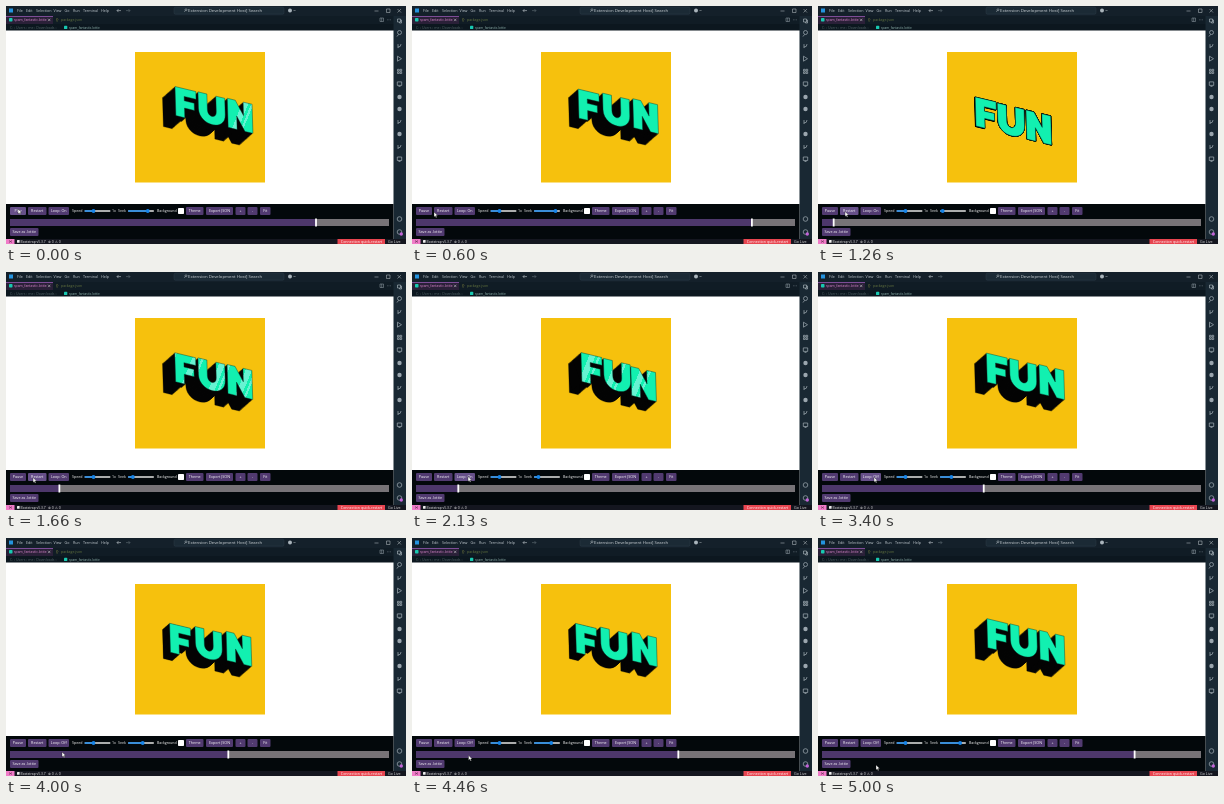
An HTML page for the animation above (5070 ms loop, 400 by 238 pixels).

```html
<!DOCTYPE html>
<html lang="en">
<head>
<meta charset="utf-8">
<title>Animation preview</title>
<style>
html, body { margin: 0; height: 100%; overflow: hidden; background: #03080b; }
svg { display: block; width: 100vw; height: 100vh; font-family: "Open Sans", "Noto Sans", sans-serif; }
</style>
</head>
<body>
<svg id="stage" viewBox="0 0 400 238"></svg>
<script>
const LOOP = 5070, STEP = 200 / 3;
const LEFT = 4, RIGHT = 383, RATE = 0.0943; // progress bar, px per ms
const LAYERS = 14;
const LETTERS = [
  'M0 0H21V8H9V12.5H19V20H9V30H0Z',
  'M23 0H32V16C32 24 41 24 41 16V0H50V17C50 35 23 35 23 17Z',
  'M52 0H60L68 14V0H77V30H69L61 16V30H52Z'
];

const rect = (x, y, w, h, fill, more = '') =>
  `<rect x="${x}" y="${y}" width="${w}" height="${h}" fill="${fill}" ${more}/>`;
const text = (x, y, str, fill = '#ddd', size = 3.7, more = '') =>
  `<text x="${x}" y="${y}" fill="${fill}" font-size="${size}" ${more}>${str}</text>`;
const line = (d, color = '#8b98a3', width = 0.6) =>
  `<path d="${d}" fill="none" stroke="${color}" stroke-width="${width}"/>`;
const button = (x, y, w, label, id = '') =>
  rect(x, y, w, 8, '#513a70', 'rx="1" class="button"') +
  text(x + w / 2, y + 5.4, label, '#fff', 3.7, `text-anchor="middle" ${id && `id="${id}"`}`);
const slider = (x, id, at) =>
  rect(x, 204.3, 26, 1.4, '#e4e4e4', 'rx=".7"') +
  rect(x, 204.3, at - x, 1.4, '#1684e8', `rx=".7" id="${id}Fill"`) +
  `<circle id="${id}" cx="${at}" cy="205" r="1.9" fill="#1684e8"/>`;

function titleBar() {
  const menu = [[11, 'File'], [20, 'Edit'], [30, 'Selection'], [47.5, 'View'], [58.5, 'Go'],
    [67, 'Run'], [77, 'Terminal'], [95, 'Help']];
  return rect(0, 0, 400, 10, '#14202a') + rect(3, 2.5, 4, 4, '#2493df') +
    menu.map(([x, s]) => text(x, 6, s, '#c4ccd2')).join('') +
    line('M115 4.6h-4l1.5-1.5M111 4.6l1.5 1.5', '#c0c8cd') +
    line('M120 4.6h4l-1.5-1.5M124 4.6l-1.5 1.5', '#5e6a73') +
    rect(168, 1.2, 110, 7, '#1b2a35', 'rx="1.5" stroke="#33424e" stroke-width=".4"') +
    line('M181 3.8a1 1 0 1 1-2 0a1 1 0 1 1 2 0M179.3 4.6l-1 1.2', '#c0c8cd', 0.5) +
    text(182, 6.2, 'Extension Development Host] Search', '#d0d6da', 4.3) +
    '<circle cx="284" cy="4.6" r="2" fill="#aab4bb"/>' +
    line('M287.5 4l1 1l1-1M368.5 5h4M380.5 3h3.5v3.5h-3.5zM391.5 3l3.5 3.5M395 3l-3.5 3.5', '#c0c8cd', 0.5);
}

function tabs() {
  return rect(0, 10, 400, 8, '#101c25') + rect(0, 10, 47, 8, '#2a2038') +
    rect(0, 10, 47, 0.6, '#b26ad6') + rect(3, 12, 3.5, 3.5, '#18c9b1', 'rx=".7"') +
    text(8, 15.4, 'spam_fantastic.lottie', '#e08bd0', 3.4) +
    line('M42 12.7l2.4 2.4M44.4 12.7l-2.4 2.4', '#ddd', 0.5) +
    text(50, 15.4, '{}', '#9a9b45', 3.4) + text(55, 15.4, 'package.json', '#65753f', 3.5) +
    line('M374 12h3.5v3.5h-3.5zM375.7 12v3.5M381 13.8h.7M382.6 13.8h.7M384.2 13.8h.7', '#98a5ad', 0.5) +
    rect(0, 18, 388, 6.5, '#0c171f') +
    text(4, 22.6, 'C: › Users › me › Downloads ›', '#536467', 3.5) +
    rect(58, 19.8, 3.3, 3.3, '#18c9b1', 'rx=".7"') +
    text(63, 22.6, 'spam_fantastic.lottie', '#91b5af', 3.2);
}

function sideBar() {
  const shapes = [
    'M-2-2h3v3h-3zM0 1v1h2v-3h-1', 'M2-1a2 2 0 1 1-4 0a2 2 0 1 1 4 0M-1 1l-1.5 2',
    'M-1.5-2v4M-1.5 1q3 0 3-3', 'M-2-2.5L2 0L-2 2.5Z', 'M-2-2h1.7v1.7h-1.7zM.5-2h1.7v1.7H.5zM-2 .5h1.7v1.7h-1.7zM.5.5h1.7v1.7H.5z',
    'M-2.2-2h4.4v3.5h-4.4zM-1 2.5h2'
  ];
  const icon = (i, y) => `<g transform="translate(393.5 ${y})">${line(shapes[i], '#a4afb7', 0.7)}</g>`;
  const dot = y => `<circle cx="393.5" cy="${y}" r="2.2" fill="#9ba6ae"/>`;
  const ring = y => `<circle cx="393.5" cy="${y}" r="2.3" fill="none" stroke="#a4afb7" stroke-width=".7"/>`;
  return rect(387.5, 10, 12.5, 223, '#192833') +
    icon(0, 15) + [1, 2, 3, 4, 5].map((n, i) => icon(n, 27.5 + i * 12.6)).join('') +
    dot(91) + dot(103) + icon(2, 116) + dot(128) + icon(2, 141) + icon(5, 153) +
    ring(213) + ring(226) + '<circle cx="395.3" cy="228" r="1.7" fill="#c264d8"/>';
}

function controls() {
  return rect(0, 198, 387.5, 35, '#03080b') +
    button(4, 201, 16, 'Pause', 'play') + button(22, 201, 18.5, 'Restart') +
    button(42.5, 201, 20.5, 'Loop: On', 'loop') +
    text(66, 206.3, 'Speed', '#fff', 3.6) + slider(78.5, 'speed', 87.5) + text(106, 206.3, '1x', '#fff', 3.6) +
    text(112, 206.3, 'Seek', '#fff', 3.6) + slider(122, 'seek', 124) +
    text(151, 206.3, 'Background', '#fff', 3.5) + rect(172, 202, 6, 6, '#fff', 'rx=".7"') +
    button(180, 201, 17.5, 'Theme') + button(200, 201, 27, 'Export JSON') +
    button(229.5, 201, 10, '+') + button(241.5, 201, 10, '-') + button(254, 201, 10.5, 'Fit') +
    rect(LEFT, 213, RIGHT - LEFT, 7, '#777377') + rect(LEFT, 213, 0, 7, '#4d376b', 'id="done"') +
    rect(0, 212.5, 1.8, 8, '#fff', 'id="head"') + button(4, 222, 28.5, 'Save as .lottie');
}

function statusBar() {
  return rect(0, 233, 400, 5, '#14161f') + rect(0, 233, 8.5, 5, '#f07bc8') +
    line('M3 234.5l1.5 1l-1.5 1M6 234.5l-1.5 1l1.5 1', '#432036', 0.5) +
    rect(11, 234, 2.6, 2.8, '#eee', 'rx=".5"') +
    text(14.5, 236.9, 'Bootstrap v5.3.7', '#eee', 3.3) + text(42, 236.9, '⊗ 0 ⚠ 0', '#ddd', 3.5) +
    rect(331.5, 233, 47.5, 5, '#e74550') +
    text(355.5, 236.8, 'Connection quick-restart', '#fff', 3.6, 'text-anchor="middle"') +
    text(382, 236.8, 'Go Live', '#ddd', 3.7);
}

function artwork() {
  const copies = LETTERS.map((_, i) => `<use href="#letter${i}" class="side"/>`.repeat(LAYERS)).join('');
  const faces = LETTERS.map((_, i) => `<use href="#letter${i}" class="face"/>`).join('');
  const stops = [[0, 0], [0.3, 0], [0.3, 1], [0.52, 1], [0.52, 0], [0.62, 0], [0.62, 1], [0.7, 1], [0.7, 0], [1, 0]];
  return `<defs>${LETTERS.map((d, i) => `<path id="letter${i}" d="${d}" transform="matrix(.99 .24 .03 .97 156.5 91.5)"/>`).join('')}
    <linearGradient id="shine" gradientUnits="userSpaceOnUse" x1="0" y1="0" x2="23" y2="9">
    ${stops.map(([o, lit]) => `<stop offset="${o}" stop-color="${lit ? '#66f3d2' : '#12f0b0'}"/>`).join('')}
    </linearGradient></defs>` +
    rect(129, 46, 130, 130.5, '#f6c10d') +
    `<g fill="#050505" stroke="#050505" stroke-width=".3">${copies}</g>
     <g fill="url(#shine)" stroke="#07352a" stroke-width=".4">${faces}</g>`;
}

const stage = document.getElementById('stage');
stage.innerHTML = rect(0, 0, 400, 238, '#fff') + artwork() + titleBar() + tabs() + sideBar() +
  controls() + statusBar() +
  '<path id="cursor" d="M0 0V5L1.2 3.9L2 5.7L2.9 5.3L2.1 3.6H3.7Z" fill="#fff" stroke="#111" stroke-width=".35"/>';

const $ = id => document.getElementById(id);
const sides = [...document.querySelectorAll('.side')];
const faces = [...document.querySelectorAll('.face')];
const buttons = [...document.querySelectorAll('.button')];
const set = (el, attrs) => Object.entries(attrs).forEach(([k, v]) => el.setAttribute(k, v));
const smooth = (a, b, v) => {
  const u = Math.min(1, Math.max(0, (v - a) / (b - a)));
  return u * u * (3 - 2 * u);
};

const PATH = [[0, 12, 203], [250, 12, 203], [600, 22, 206], [1100, 27, 205.5], [1720, 27, 205.5],
  [2060, 56, 204.5], [3300, 56, 204.5], [3900, 56, 214], [4250, 56, 214], [4900, 58, 227], [LOOP, 58, 227]];

function pointer(t) {
  const i = PATH.findIndex((k, n) => n && t <= k[0]);
  const a = PATH[i - 1], b = PATH[i], u = smooth(a[0], b[0], t);
  return [a[1] + (b[1] - a[1]) * u, a[2] + (b[2] - a[2]) * u];
}

function hover([x, y]) {
  for (const b of buttons) {
    const dx = x - b.getAttribute('x'), dy = y - b.getAttribute('y');
    const inside = dx > 0 && dx < b.getAttribute('width') && dy > 0 && dy < 8;
    set(b, { fill: inside ? '#67508a' : '#513a70' });
  }
}

// Playback starts at 283 ms, wraps once, then is restarted twice.
function progress(t) {
  const span = RIGHT - LEFT;
  if (t >= 1685) return (t - 1685) * RATE / span;
  if (t >= 1143) return (t - 1143) * RATE / span;
  return (306 + Math.max(0, t - 283) * RATE) / span % 1;
}

// How far each letter stands out: it rises, sways and sinks back.
function depth(i, p) {
  const sway = [0.29, 0.18, 0.08][i], level = [0.71, 0.84, 0.99][i];
  const wave = level + sway * Math.cos(2 * Math.PI * (p - 0.11 - i * 0.008) / 0.35);
  const start = 0.015 + i * 0.014;
  return wave * smooth(start, start + 0.095, p) * (1 - smooth(0.93, 0.995, p));
}

function draw(now) {
  const t = Math.min(75, Math.floor((now % LOOP + 8) / STEP)) * STEP;
  const p = progress(t), x = LEFT + p * (RIGHT - LEFT);

  LETTERS.forEach((_, i) => {
    const e = depth(i, p), move = k => `translate(${12.5 * e * k} ${-11 * e * k})`;
    for (let k = 0; k < LAYERS; k++) sides[i * LAYERS + k].setAttribute('transform', move(k / LAYERS));
    faces[i].setAttribute('transform', move(1));
  });

  const early = p > 0.065 && p < 0.155, late = p > 0.74 && p < 0.82;
  const shift = early ? (p - 0.11) * 500 : late ? -30 + (p - 0.74) * 1330 : -200;
  set($('shine'), { spreadMethod: early ? 'repeat' : 'pad', gradientTransform: `translate(${shift} 0)` });

  const thumb = 124 + p * 22;
  set($('done'), { width: x - LEFT });
  set($('head'), { x: x - 0.9 });
  set($('seek'), { cx: thumb });
  set($('seekFill'), { width: thumb - 122 });
  $('play').textContent = t < 283 ? 'Play' : 'Pause';
  $('loop').textContent = t < 2300 ? 'Loop: On' : 'Loop: Off';
  const tip = pointer(t);
  hover(tip);
  set($('cursor'), { transform: `translate(${tip})` });
}

const begin = performance.now();
function tick() {
  draw(performance.now() - begin);
  requestAnimationFrame(tick);
}
tick();
</script>
</body>
</html>
```
